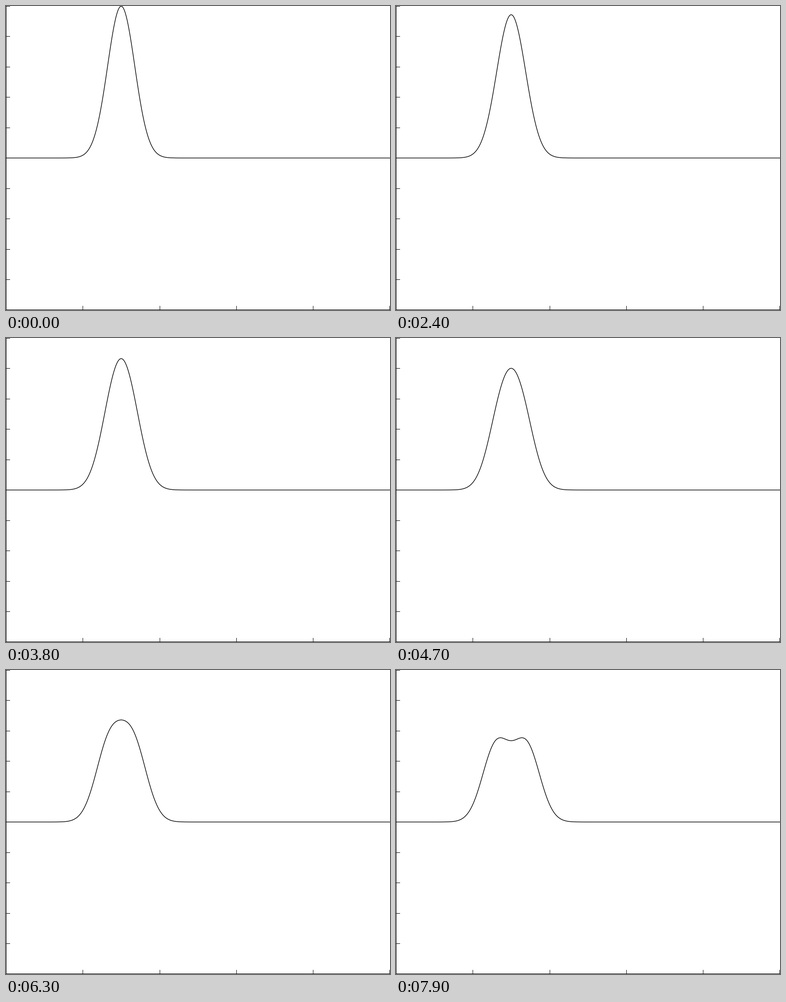
A matplotlib script for the animation above (8000 ms loop, 842x665 px).

```python
import matplotlib.pyplot as plt
import numpy as np
from matplotlib.animation import FuncAnimation

plt.rcParams["path.simplify"] = False
plt.rcParams["path.snap"] = False

W, H, DPI = 842, 665, 100
FRAMES, INTERVAL = 80, 100
PX = 72 / DPI           # one pixel in points

SPAN = 841.25           # axis width in pixels
BASE = 332.5            # pixel row of u = 0
AMP = 332               # pixels per unit height
SPEED = 0.0005          # wave travel per frame, in axis widths
TICK = 9

fig = plt.figure(figsize=(W / DPI, H / DPI), dpi=DPI, facecolor="white")
ax = fig.add_axes([0, 0, 1, 1])
ax.set_xlim(0, W)
ax.set_ylim(H, 0)
ax.axis("off")


def rule(x0, y0, x1, y1):
    ax.plot([x0, x1], [y0, y1], color="black", lw=PX, solid_capstyle="butt")


# Axes with inward ticks
rule(0.5, 0, 0.5, H)
rule(0, H - 0.5, W, H - 0.5)
for k in range(10):
    y = np.floor(66.5 * k) + 0.5
    rule(0, y, TICK, y)
for k in range(1, 6):
    x = np.floor(168.25 * k + 0.5) + 0.5
    rule(x, H - TICK, x, H)


def pulse(x):
    return np.exp(-400 * (x - 0.3) ** 2)


xs = np.linspace(0, 1.001, 1002)
curve, = ax.plot([], [], color="black", lw=1.4 * PX, solid_joinstyle="round")


def update(i):
    # d'Alembert: the pulse splits into two halves running apart
    s = SPEED * i
    u = 0.5 * (pulse(xs - s) + pulse(xs + s))
    curve.set_data(xs * SPAN + 0.2, BASE - AMP * u)
    return curve,


anim = FuncAnimation(fig, update, frames=FRAMES, interval=INTERVAL,
                     repeat=True, repeat_delay=0, blit=False)
plt.show()
```
